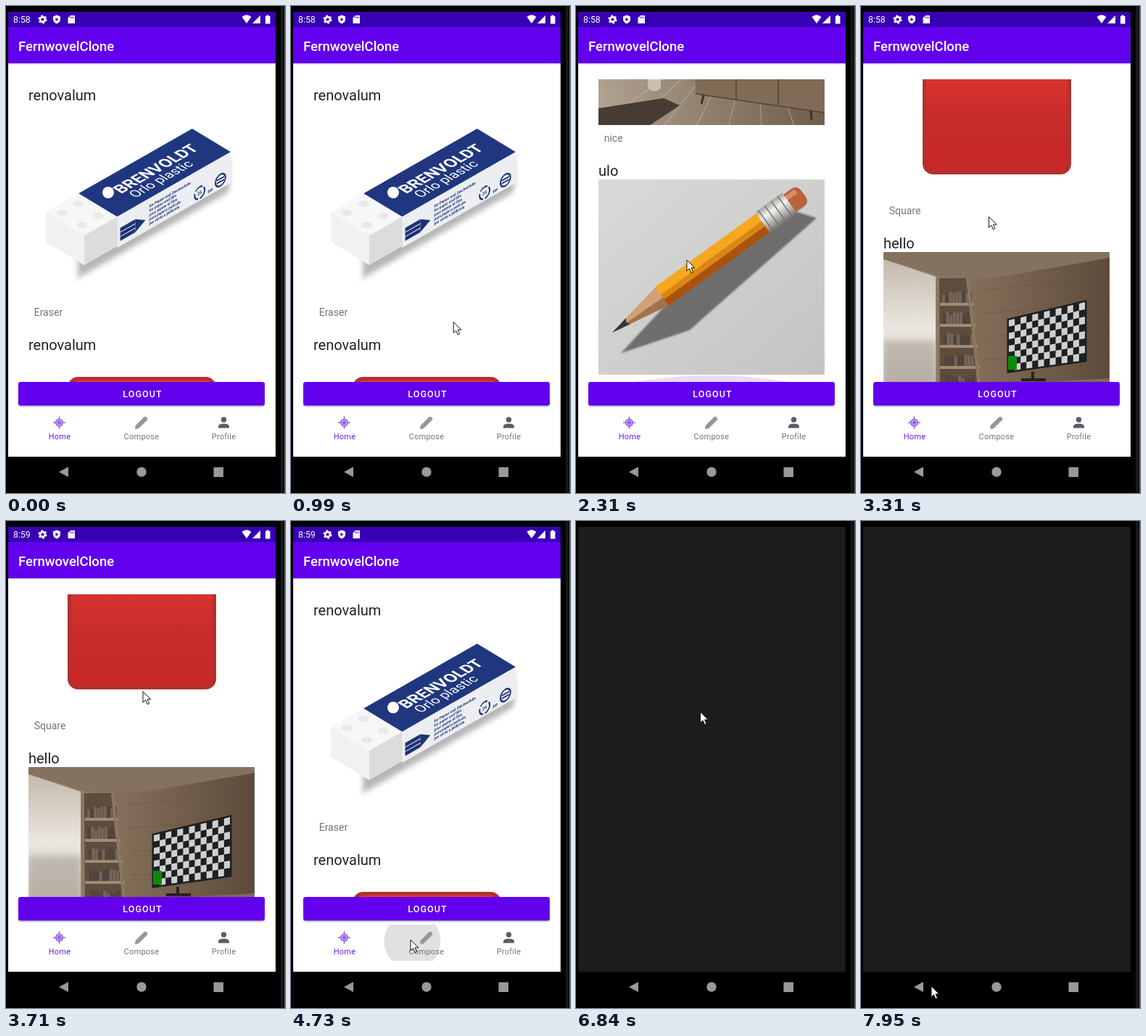
An HTML page for the animation above (8 s loop, 385 px wide and 671 px high).

```html
<!DOCTYPE html>
<html lang="en">
<head>
<meta charset="utf-8">
<style>
html, body { margin: 0; width: 100%; height: 100%; overflow: hidden; background: #000; }
svg { display: block; width: 385px; height: 671px; font-family: Roboto, sans-serif; }
.name { font-size: 20px; fill: #222; }
.cap { font-size: 14px; fill: #757575; }
.btn { font-size: 12.5px; font-weight: 500; letter-spacing: 1.1px; fill: #fff; text-anchor: middle; }
.tab { font-size: 11px; letter-spacing: .25px; text-anchor: middle; }
</style>
</head>
<body>
<svg id="stage" viewBox="0 0 385 671" xmlns="http://www.w3.org/2000/svg"></svg>
<script>
const poly = (pts, fill, extra = '') => `<polygon points="${pts}" fill="${fill}" ${extra}/>`;
const box = (x, y, w, h, fill, extra = '') => `<rect x="${x}" y="${y}" width="${w}" height="${h}" fill="${fill}" ${extra}/>`;
const dot = (x, y, r, fill, extra = '') => `<circle cx="${x}" cy="${y}" r="${r}" fill="${fill}" ${extra}/>`;
const line = (d, stroke, w, extra = '') => `<path d="${d}" fill="none" stroke="${stroke}" stroke-width="${w}" ${extra}/>`;
const shape = (d, fill) => `<path d="${d}" fill="${fill}"/>`;
const group = (how, body) => `<g transform="${how}">${body}</g>`;
const label = (x, y, cls, s) => `<text x="${x}" y="${y}" class="${cls}">${s}</text>`;
const text = (x, y, size, weight, fill, s) => `<text x="${x}" y="${y}" font-size="${size}" font-weight="${weight}" fill="${fill}">${s}</text>`;
const repeat = (n, f) => Array.from({ length: n }, (_, i) => f(i)).join('');
const grad = (id, dir, ...stops) => `<linearGradient id="${id}" ${dir}>` +
  stops.map((c, i) => `<stop offset="${i / (stops.length - 1)}" stop-color="${c}"/>`).join('') + '</linearGradient>';
const DOWN = 'x1="0" y1="0" x2="0" y2="1"', ACROSS = 'x1="0" y1="0" x2="1" y2="0"', DIAG = 'x1="0" y1="0" x2="1" y2="1"';

let seed = 7;
const random = () => (seed = seed * 16807 % 2147483647) / 2147483647;

const defs = `<defs>
${grad('red', DOWN, '#e53935', '#d83430', '#c62b28', '#c62828')}
${grad('wall', ACROSS, '#a99a87', '#86725d', '#735f4b', '#5d4a3b')}
${grad('glass', DOWN, '#c4b9ac', '#ebe7e0', '#c3bbb1')}
${grad('floor', ACROSS, '#b0a291', '#8f7e6c', '#6f5d4c')}
${grad('paper', DIAG, '#d9d9d8', '#cfcfce', '#c3c3c3')}
${grad('metal', DOWN, '#a5a3a0', '#f2f2f0', '#b5b3b0', '#6f6c69')}
<filter id="soft" x="-20%" y="-20%" width="140%" height="140%"><feGaussianBlur stdDeviation="4"/></filter>
<filter id="tiny"><feGaussianBlur stdDeviation="1.2"/></filter>
<clipPath id="list"><rect x="3" y="101" width="369" height="418"/></clipPath>
<clipPath id="photo"><rect width="312" height="269"/></clipPath>
<clipPath id="tabs"><rect x="3" y="556" width="369" height="50"/></clipPath>
<clipPath id="screen"><rect x="3" y="8" width="369" height="613"/></clipPath>
</defs>`;

// a box in parallel projection: each face has its own skewed frame
function eraser() {
  const ink = '#1d3175', along = '.87 -.496', back = '.856 .516';
  const lines = ['für Papier und Zeichenfolie', 'for paper and film', 'pour papier et film', 'para papel y película', 'per carta e pellicola'];
  const top = box(0, 0, 52, 62, '#f7f7f7') + box(52, 0, 180, 62, '#20377f') +
    repeat(4, i => dot(12 + 26 * (i % 2), 14 + 32 * (i >> 1), 6, '#e9e9ea')) +
    text(86, 34, 22, 700, '#fff', 'BRENVOLDT') + text(92, 51, 18.5, 400, '#fff', 'Orlo plastic');
  const front = box(0, 0, 52, 41, '#dcdcdf') + box(52, 0, 180, 43, '#eceef2') +
    box(57, 18, 24, 18, ink) + poly('81,18 97,27 81,36', ink) + line('M57 24H81M57 30H81', '#eceef2', 1.2) +
    lines.map((s, i) => text(103, 13 + i * 6, 5.4, 700, ink, s)).join('') +
    dot(183, 32, 8, 'none', `stroke="${ink}" stroke-width="2.200" stroke-dasharray="12 3"`) + text(179.5, 34.5, 6, 700, ink, '25') +
    text(196, 40, 6, 700, ink, 'PP') + dot(216, 31, 8, 'none', `stroke="${ink}" stroke-width="2.200"`) + line('M210 29H222M210 33H222', ink, 2);
  const shadow = box(-10, 8, 240, 46, '#858585', 'opacity=".6" filter="url(#soft)"');
  return group(`matrix(${along} 0 1 108 316)`, shadow) +
    group('matrix(.856 .516 0 1 55 284)', box(0, 0, 62, 41, '#f1f1f2')) +
    group(`matrix(${along} 0 1 108 316)`, front) +
    group(`matrix(${along} ${back} 55 284)`, top) + dot(141, 257, 8, '#fff');
}

const square = box(87.5, 513.5, 200, 200, 'url(#red)', 'rx="12" stroke="#b3302d" stroke-width="5"');

function room() {
  const cols = 13, rows = 8;
  // screen surface: left edge 94..164, right edge a little taller
  const pt = (u, v) => [173 + 105 * u, 94 - 25 * u + (70 + 10 * u) * v].map(n => n.toFixed(1));
  const quad = (u, v, w, h) => 'M' + [pt(u, v), pt(u + w, v), pt(u + w, v + h), pt(u, v + h)].join('L') + 'Z';
  const cells = repeat(cols * rows, i => {
    const c = i % cols, r = (i - c) / cols;
    return (c + r) % 2 ? '' : quad(c / cols, r / rows, 1 / cols, 1 / rows);
  });
  const shelves = repeat(5, i => repeat(9, k => {
    const h = 11 + random() * 6, y = 70 + i * 29;
    return box(81 + i + k * 4.6, y - h, 3.8, h, random() < .5 ? '#4f443b' : '#75655a');
  }) + box(78, 70 + i * 29, 46 + i * 3, 4, '#a08b74'));
  const planks = repeat(7, i => `M${i * 45} 270L${110 + i * 22} 190`);
  const boards = repeat(6, i => `M140 ${20 + i * 32}L312 ${i * 38 - 4}`);
  return box(0, 0, 312, 270, 'url(#wall)') + line(boards, '#5b4738', 1, 'opacity=".35"') +
    poly('0,0 312,0 312,8 150,36 80,34 0,10', '#84725f') +
    poly('0,10 72,34 72,185 0,200', 'url(#glass)') +
    box(0, 122, 72, 66, '#a69c91', 'opacity=".55" filter="url(#soft)"') +
    poly('75,36 116,36 132,195 76,195', '#5e4c3e') + shelves +
    line('M75 36L76 195M116 36L133 195', '#8d7761', 4) +
    box(0, 188, 312, 82, 'url(#floor)') + line(planks, '#c9bcab', 1.3, 'opacity=".5"') +
    poly('0,246 90,232 112,242 70,270 0,270', '#473c33') +
    poly('133,184 312,174 312,252 134,226', '#806b56') +
    line('M134 226L312 252M190 182V234M248 179V242', '#544335', 1.5) +
    line('M145 228L142 240M293 249L294 262', '#3f3127', 3) +
    box(68, 190, 18, 32, '#cabfb0', 'rx="7"') +
    line('M206 165V176M190 176H224', '#26211d', 4) +
    `<path d="${quad(0, 0, 1, 1)}" fill="#201f20" stroke="#201f20" stroke-width="5"/>` +
    shape(cells, '#cdd0d3') + box(172, 143, 12, 19, '#0b8a0b');
}

// drawn lying flat with the tip at zero, then turned
function pencil() {
  const lying = poly('-7,30 75,14 300,10 321,38 88,60', '#5f5c5d', 'opacity=".85" filter="url(#tiny)"') +
    poly('0,0 88,-16 92,2 0,0', '#d3a077') + poly('0,0 92,2 88,16', '#a2714d') + poly('0,0 27,-5 24,0 27,5', '#3a3432') +
    box(85, -16, 174, 13, '#f5a81f') + box(85, -3, 174, 8, '#dd860f') + box(85, 5, 174, 11, '#a9530f') +
    box(295, -15, 31, 30, '#b9623c', 'rx="9"') + box(300, -12, 20, 7, '#d98b66', 'rx="3"') +
    box(257, -18, 46, 36, 'url(#metal)', 'rx="2"') + line(repeat(4, i => `M${262 + i * 11} -18V18`), '#777570', 1.5);
  return box(0, 0, 312, 270, 'url(#paper)') + group('translate(19 211) rotate(-36)', lying);
}

const GAP = 344;
const feed = [
  ['renovalum', 'Eraser', eraser()],
  ['renovalum', 'Square', square],
  ['hello', 'nice', room()],
  ['ulo', 'Pencil', pencil()]
].map(([who, cap, art], i) => {
  const y = GAP * i;
  const pic = i < 2 ? art : `<g transform="translate(31 ${135 + y})" clip-path="url(#photo)">${art}</g>`;
  return pic + label(31, 129.7 + y, 'name', who) + label(38.7, 426.7 + y, 'cap', cap);
}).join('');

const button = (y, s) => box(17, y + 1.5, 340, 32.5, '#000', 'rx="3" opacity=".3" filter="url(#tiny)"') +
  box(17, y, 340, 32.5, '#6200ee', 'rx="3"') + label(188.5, y + 21, 'btn', s);

const statusBar = box(3, 8, 369, 21, '#3700b3') +
  `<text id="clock" x="10" y="23" font-size="12.300" fill="#fff"></text>` +
  dot(50.5, 18.5, 3.4, 'none', 'stroke="#fff" stroke-width="2.600"') +
  dot(50.5, 18.5, 5.2, 'none', 'stroke="#fff" stroke-width="1.800" stroke-dasharray="2.700 2.750"') +
  shape('M70 12.5L75 14.5V18Q75 22.5 70 24.5Q65 22.5 65 18V14.5Z', '#fff') + poly('68.5,16 72.5,18.5 68.5,21', '#3700b3') +
  shape('M89 13H95V24H85.5V16.5Z', '#fff') + line('M89 14.5V17M91 14.5V17M93 14.5V17', '#3700b3', .9) +
  shape('M325.5 15Q332 9.5 338.5 15L332 24Z', '#fff') + poly('340,24 351,24 351,13', '#fff') +
  box(358, 14, 6.5, 10.5, '#fff') + box(359.5, 12.5, 3, 2, '#fff');

const tabs = box(3, 551.5, 369, 69.5, '#fff') +
  `<g clip-path="url(#tabs)"><circle id="ripple" cx="167.500" cy="579" fill="#e1e1e1"/></g>
  <g id="homeIcon">${dot(73.5, 574, 5.6, 'currentColor')}${line('M73.5 565.5V582.5M65 574H82', 'currentColor', 1.7)}
  ${dot(73.5, 574, 3.4, 'none', 'stroke="#fff" stroke-width=".9" opacity=".65"')}</g>
  <g id="penIcon">${group('translate(178 583) rotate(-45)', shape('M0 0L4 -3H20Q23 -3 23 0Q23 3 20 3H4Z', 'currentColor'))}</g>` +
  dot(300.5, 570, 3.7, '#5d5b66') + shape('M293 581.5V579.5Q293 575.5 300.5 575.5Q308 575.5 308 579.5V581.5Z', '#5d5b66') +
  `<g id="homeText">${label(74, 597, 'tab', 'Home')}</g><g id="penText">${label(187, 597, 'tab', 'Compose')}</g>
  <g fill="#747474">${label(300.5, 597, 'tab', 'Profile')}</g>`;

const $ = id => document.getElementById(id);
$('stage').innerHTML = defs + box(0, 0, 385, 671, '#000') + box(379, 0, 4, 671, '#171717') + box(384, 0, 1, 671, '#555') +
  box(3, 8, 369, 613, '#fff') +
  `<g id="home" clip-path="url(#list)"><g id="feed">${feed}</g><path id="glow" fill="#6200ee" opacity=".14"/></g>
  <g id="compose">${text(20.5, 120, 16, 400, '#999', 'Description...')}
  ${line('M21 126.5H354', '#777', 1)}${button(152.5, 'TAKE PICTURE')}${button(393, 'SUBMIT')}</g>` +
  tabs + button(518, 'LOGOUT') +
  box(3, 79, 369, 2, '#000', 'opacity=".1"') + statusBar + box(3, 29, 369, 50, '#6200ee') +
  text(17, 61.5, 18.5, 500, '#fff', 'FernwovelClone') +
  `<g clip-path="url(#screen)">${box(3, 8, 369, 613, '#1c1c1c', 'id="camera"')}</g>` +
  poly('73,642 86,635 86,649', '#999') + dot(187, 642, 6.7, '#999') + box(286.5, 635.5, 13.5, 13.5, '#999') +
  `<g id="cursor"><circle id="press" r="12" fill="#ffea00" opacity=".6"/>
  <path d="M0 0V15L3.500 11.800L6 17.500L8.500 16.500L6 10.800H10.800Z" fill="#fff" stroke="#111"/></g>`;

const LOOP = 8000, FIRST = 179, STEP = 100.7, DRAG = 200, FLING = 300;
const moves = [], drags = [], presses = [];
let pos = [327, 653], offset = 0;

function go(t, d, x, y) {
  moves.push({ t, d, a: pos, b: [x, y] });
  pos = [x, y];
}
function press(t) { presses.push(t); }
function drag(t, dy, to) {
  press(t);
  drags.push({ t, dy, from: offset, to });
  offset = to;
  go(t, DRAG, pos[0] - 8, pos[1] + dy);
}

go(FIRST, 300, 247, 450);
go(800, 380, 200, 420);
drag(1185, -120, 323);
go(1390, 300, 177, 395);
drag(1785, -165, 928);
go(1990, 300, 153, 350);
go(2600, 190, 165, 215);
drag(2790, 160, 484);
go(2995, 505, 189, 235);
drag(3800, 150, 0);
go(4005, 300, 165, 577);
press(4400);
go(4910, 500, 225, 420);
go(5410, 300, 112, 300);
go(5710, 400, 186, 172);
press(6415);
go(6730, 490, 112, 641);
go(7230, 300, 99, 641);
go(7930, 1, 97, 641);

const clamp = u => Math.max(0, Math.min(1, u));
const mix = (a, b, u) => a + (b - a) * u;
const latest = (list, t) => list.filter(m => m.t <= t).pop();

function scrollAt(t) {
  const g = latest(drags, t);
  if (!g) return 0;
  const held = g.from - g.dy * clamp((t - g.t) / DRAG);
  return mix(held, g.to, 1 - (1 - clamp((t - g.t - DRAG) / FLING)) ** 2);
}
const show = (id, on) => $(id).setAttribute('visibility', on ? 'visible' : 'hidden');
const set = (id, prop, v) => $(id).setAttribute(prop, v);

function draw(ms) {
  const t = ms < FIRST ? 0 : FIRST + Math.floor((ms - FIRST) / STEP) * STEP;
  const composing = t > 4800;
  $('clock').textContent = t < 3600 ? '8:58' : '8:59';
  show('home', !composing);
  show('compose', composing);
  set('feed', 'transform', `translate(0 ${-scrollAt(t).toFixed(1)})`);
  set('glow', 'd', `M75 519Q187 ${519 - 20 * clamp(1 - Math.abs(t - 2293) / 200)} 300 519Z`);
  set('ripple', 'r', composing ? 0 : 39 * clamp((t - 4400) / 300));
  for (const [id, active] of [['home', !composing], ['pen', composing]]) {
    set(id + 'Icon', 'color', active ? '#9666ea' : '#95979a');
    set(id + 'Text', 'fill', active ? '#6a1bea' : '#747474');
  }
  const open = clamp((t - 6520) / 300);
  set('camera', 'opacity', open);
  set('camera', 'y', mix(58, 8, open));
  const m = latest(moves, t);
  show('cursor', m);
  if (m) {
    const u = clamp((t - m.t) / m.d);
    set('cursor', 'transform', `translate(${mix(m.a[0], m.b[0], u).toFixed(1)} ${mix(m.a[1], m.b[1], u).toFixed(1)})`);
  }
  set('press', 'r', presses.some(p => t >= p && t < p + DRAG) ? 12 : 0);
}

const begin = performance.now();
function tick() {
  draw((performance.now() - begin) % LOOP);
  requestAnimationFrame(tick);
}
tick();
</script>
</body>
</html>
```
